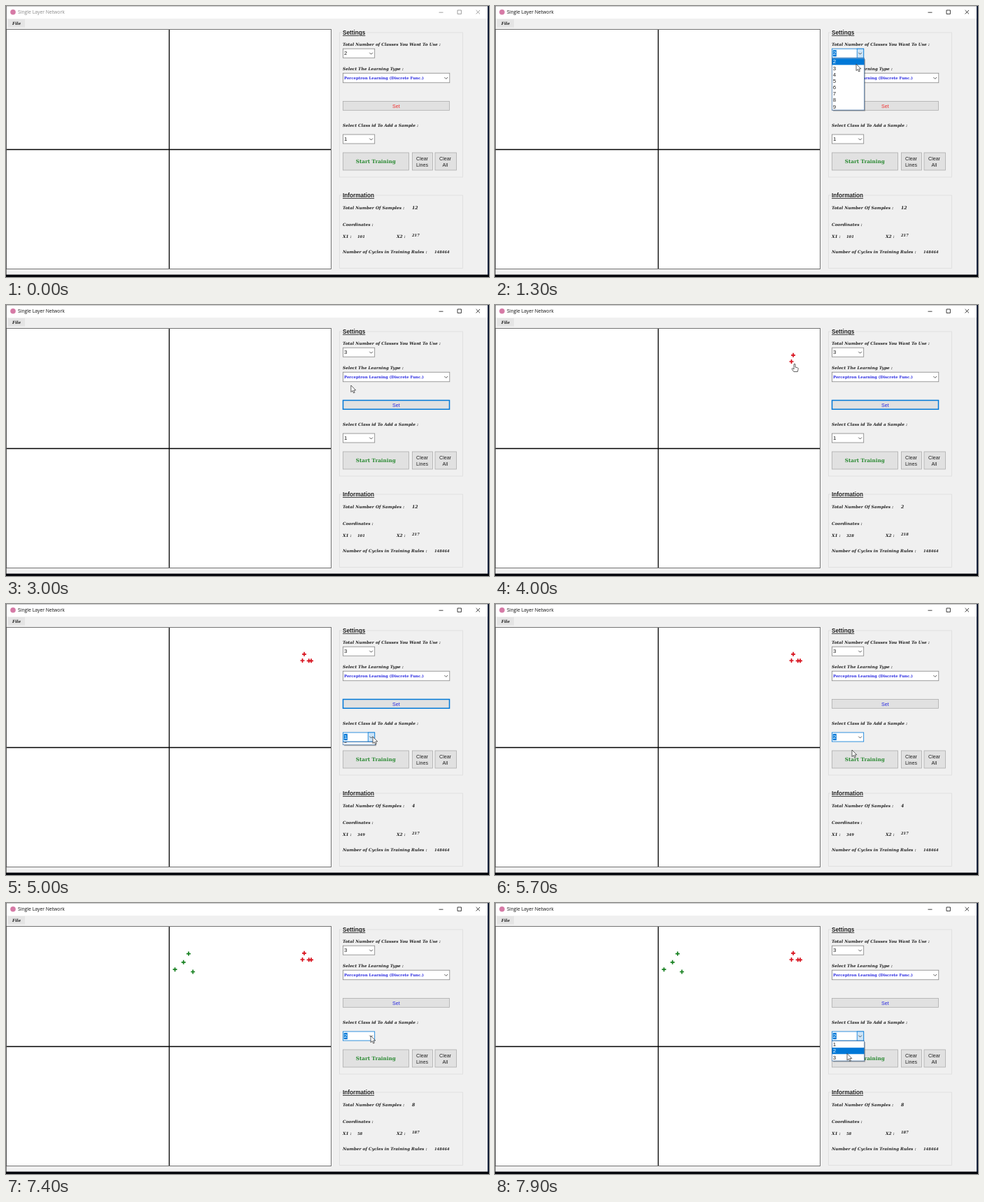
Write an HTML page that moves like this. It is 690x388 px and loops after 8000 ms.

```html
<!DOCTYPE html>
<html lang="en">
<head>
<meta charset="utf-8">
<title>Single Layer Network</title>
<style>
  html, body { margin: 0; width: 100%; height: 100%; overflow: hidden; background: #f0f0f0; }
  svg { display: block; }
  text { fill: #222; }
  .label { font: italic bold 5.83px "DejaVu Serif", serif; }
  .value { font: italic bold 5.2px "DejaVu Serif", serif; }
  .count { font: italic bold 6.2px "DejaVu Serif", serif; }
  .head { font: bold 8.2px "Liberation Sans", sans-serif; text-decoration: underline; }
  .ui { font: 7.1px "Liberation Sans", sans-serif; text-anchor: middle; }
  .item { font: 7.8px "Liberation Sans", sans-serif; }
  .title { font: 6.8px "Open Sans", sans-serif; }
  .type { font: bold 5.41px "DejaVu Serif", serif; fill: #2a2ae0; }
  .start { font: bold 7.19px "DejaVu Serif", serif; fill: #2a8a32; text-anchor: middle; }
  .group { fill: none; stroke: #dcdcdc; stroke-width: .8; }
  .button { fill: #e1e1e1; stroke: #adadad; stroke-width: .8; }
</style>
</head>
<body>
<svg id="stage" width="690" height="388" viewBox="0 0 690 388">
  <rect width="690" height="388" fill="#f0f0f0"/>
  <rect width="690" height="18" fill="#fff"/>
  <circle cx="10" cy="8.8" r="3.8" fill="#d67aa6"/>
  <rect x="3" y="19" width="24" height="11.5" fill="#e4e4e4"/>
  <text class="label" x="9" y="26.8">File</text>

  <rect x=".5" y="33.5" width="464" height="343" fill="#fff" stroke="#666" stroke-width=".9"/>
  <path d="M233.2 34V376M1 205.5H464" stroke="#000" stroke-width="1.3"/>

  <rect class="group" x="476.5" y="38" width="176" height="207"/>
  <rect class="group" x="476.5" y="271" width="176" height="104.5"/>
  <path d="M480 38h35M480 271h47" stroke="#f0f0f0" stroke-width="3"/>
  <text class="head" x="481" y="41">Settings</text>
  <text class="head" x="481" y="274">Information</text>

  <text class="label" x="481" y="57.2">Total Number of Classes You Want To Use :</text>
  <text class="label" x="481" y="92.2">Select The Learning Type :</text>
  <text class="label" x="481" y="172.7">Select Class id To Add a Sample :</text>
  <text class="label" x="481" y="290.5">Total Number Of Samples :</text>
  <text class="label" x="481" y="314.5">Coordinates :</text>
  <text class="label" x="481" y="331.8">X1 :</text>
  <text class="label" x="558" y="331.8">X2 :</text>
  <text class="label" x="481" y="354.2">Number of Cycles in Training Rules :</text>
  <text class="value" x="612" y="354.2">148464</text>

  <rect class="button" x="481.5" y="210" width="94" height="25"/>
  <rect class="button" x="580.5" y="210" width="29" height="25"/>
  <rect class="button" x="613" y="210" width="30.5" height="25"/>
  <text class="start" x="528.3" y="225.3">Start Training</text>
  <text class="ui" x="594.5" y="221">Clear</text>
  <text class="ui" x="594.5" y="230">Lines</text>
  <text class="ui" x="627.5" y="221">Clear</text>
  <text class="ui" x="627.5" y="230">All</text>

  <g id="live"></g>

  <path d="M.4 0V385" stroke="#444" stroke-width=".8"/>
  <path d="M0 .2H690" stroke="#555" stroke-width=".5"/>
  <path d="M689 0V388" stroke="#14203a" stroke-width="2"/>
  <rect y="384.6" width="690" height="3.4" fill="#05070c"/>
  <g id="cursor"></g>
</svg>
<script>
const LOOP = 8000, STEP = 100, BLUE = '#0078d7', ROW = 9.15;
const live = document.getElementById('live');
const cursor = document.getElementById('cursor');

// time, x, y of the pointer tip
const path = [
  [100, 228, 196], [900, 519, 67], [1000, 519, 67], [1300, 516, 83], [1400, 516, 83],
  [1500, 516, 84.5], [1700, 516, 84.5], [2200, 541, 158], [2400, 538, 151], [2600, 537, 145],
  [2700, 537, 145], [3400, 434, 75], [3600, 426, 72], [3800, 423, 81], [3900, 423, 81],
  [4000, 428, 84], [4200, 433, 81], [4400, 436, 81], [4800, 522, 189], [5000, 524, 190],
  [5200, 521, 193], [5500, 510, 209], [5700, 510, 209], [6100, 261, 72], [6300, 253.5, 84.5],
  [6500, 241.5, 95], [6600, 250, 98], [6800, 267, 98], [7400, 521, 190], [7600, 521, 191],
  [7900, 503, 215.5]
];

// time, centre, colour, shown coordinates
const samples = [
  [3600, 426, 71.8, '#d8101c', 333, 233], [3900, 423.5, 81, '#d8101c', 328, 218],
  [4200, 432.7, 81.3, '#d8101c', 344, 217], [4400, 436, 81.3, '#d8101c', 349, 217],
  [6100, 260.8, 72.6, '#16801f', 47, 232], [6300, 253.6, 84.8, '#16801f', 36, 212],
  [6500, 241.4, 95.2, '#16801f', 14, 193], [6800, 267, 98.5, '#16801f', 58, 187]
];

const between = (t, from, to) => t >= from && t < to;
const text = (cls, x, y, value, fill) =>
  `<text class="${cls}" x="${x}" y="${y}"${fill ? ` style="fill:${fill}"` : ''}>${value}</text>`;
const rect = (x, y, w, h, fill, stroke = 'none', width = .8) =>
  `<rect x="${x}" y="${y}" width="${w}" height="${h}" fill="${fill}" stroke="${stroke}" stroke-width="${width}"/>`;

function pointerAt(t) {
  const i = path.findIndex(point => point[0] >= t);
  if (i < 1) return path[0].slice(1);
  const [t0, x0, y0] = path[i - 1], [t1, x1, y1] = path[i];
  const k = (t - t0) / (t1 - t0);
  return [x0 + (x1 - x0) * k, y0 + (y1 - y0) * k];
}

function combo(y, w, h, { focus, open } = {}) {
  const right = 481.4 + w;
  return rect(481.4, y, w, h, '#fff', focus ? BLUE : '#858585') +
    (open ? rect(right - 9.5, y, 9.5, h, '#cce4f7', BLUE) : '') +
    `<path d="M${right - 7.4} ${y + h / 2 - .9}l2.3 2.3 2.3-2.3" fill="none" stroke="#444" stroke-width=".9"/>`;
}

function numberCombo(y, value, state) {
  return combo(y, 45.3, 13, state) +
    (state.focus ? rect(482.6, y + 1.9, 5.2, 9.2, BLUE) : '') +
    text('item', 482.9, y + 9.2, value, state.focus && '#fff');
}

// A list that slides down from under its combo box.
function list(y, first, count, hot, since) {
  const full = count * ROW + 1.2, shown = Math.min(1, since / 200) * full;
  let rows = '';
  for (let i = 0; i < count; i++) {
    const top = shown - full + .6 + i * ROW, active = first + i === hot;
    rows += (active ? rect(0, top, 47, ROW, BLUE) : '') +
      text('item', 1.7, top + 7.3, first + i, active && '#fff');
  }
  return rect(483, y + 1.5, 46, shown, 'rgba(0,0,0,.3)') +
    `<svg x="481" y="${y}" width="46.7" height="${shown}">${rect(0, 0, 47, full, '#fff')}${rows}</svg>` +
    rect(481.3, y, 46, shown, 'none', '#3c6ea5', .7);
}

function titleBar(active) {
  const ink = active ? '#111' : '#8a8a8a';
  return text('title', 17, 11.2, 'Single Layer Network', ink) +
    `<path d="M618.5 9.2h6M645 6h5.4v5.4H645zM671.6 6l5.4 5.4m0-5.4l-5.4 5.4" fill="none" stroke="${ink}" stroke-width=".8"/>`;
}

function setButton(t) {
  const hover = between(t, 2300, 2700), isDefault = between(t, 2700, 5700);
  return rect(481.5, 136.5, 152, 12.8, hover ? '#e5f1fb' : '#e1e1e1',
      hover || isDefault ? BLUE : '#adadad', isDefault ? 1.5 : .8) +
    text('ui', 557.3, 145.6, 'Set', t < 2700 ? '#f03030' : '#2a2ae0');
}

function pointer(t) {
  if (t < 100) return '';
  const [x, y] = pointerAt(t);
  const shape = x < 464
    ? 'M-1 .8Q0-.6 1 .8V5L4.6 6Q5.4 6.4 5.2 7.5L4.3 11.5H-1.2L-4 7.4Q-3.6 6-2.2 7L-1 8z'
    : 'M0 0V9.6L2.2 7.6 3.7 11 5.3 10.3 3.8 7H6.8z';
  return `<path transform="translate(${x} ${y})" d="${shape}" fill="#fff" stroke="#222" stroke-width=".7" stroke-linejoin="round"/>`;
}

function draw(t) {
  const placed = samples.filter(s => s[0] <= t);
  const [, , , , x1, x2] = placed.at(-1) || [0, 0, 0, 0, 101, 217];
  const classesOpen = between(t, 1000, 1700);
  const idOpen = between(t, 5000, 5700) || t >= 7500;
  const idFocus = t >= 4900;

  live.innerHTML = titleBar(t >= 1000) +
    numberCombo(61.2, t < 1700 ? 2 : 3, { focus: between(t, 1000, 2700), open: classesOpen }) +
    combo(96.2, 152.4, 13.6) +
    text('type', 483, 105, 'Perceptron Learning (Discrete Func.)') +
    setButton(t) +
    numberCombo(184, t < 5700 ? 1 : 2, { focus: idFocus, open: idOpen }) +
    text('count', 580, 290.8, placed.length || 12) +
    text('value', 502, 332, x1) +
    text('value', 580, 330.4, x2) +
    placed.map(([, x, y, color]) =>
      `<path d="M${x - 3} ${y}h6M${x} ${y - 3}v6" stroke="${color}" stroke-width="1.7"/>`).join('') +
    (classesOpen ? list(74.6, 2, 8, t < 1500 ? 2 : 3, t - 970) : '') +
    (idOpen ? list(197.4, 1, 3, t < 5400 ? 1 : 2, t - (t < 7500 ? 4970 : 7470)) : '');
  cursor.innerHTML = pointer(t);
}

const begin = performance.now();
let last = -1;
function tick() {
  const t = Math.floor((performance.now() - begin) % LOOP / STEP) * STEP;
  if (t !== last) draw(last = t);
  requestAnimationFrame(tick);
}
tick();
</script>
</body>
</html>
```
